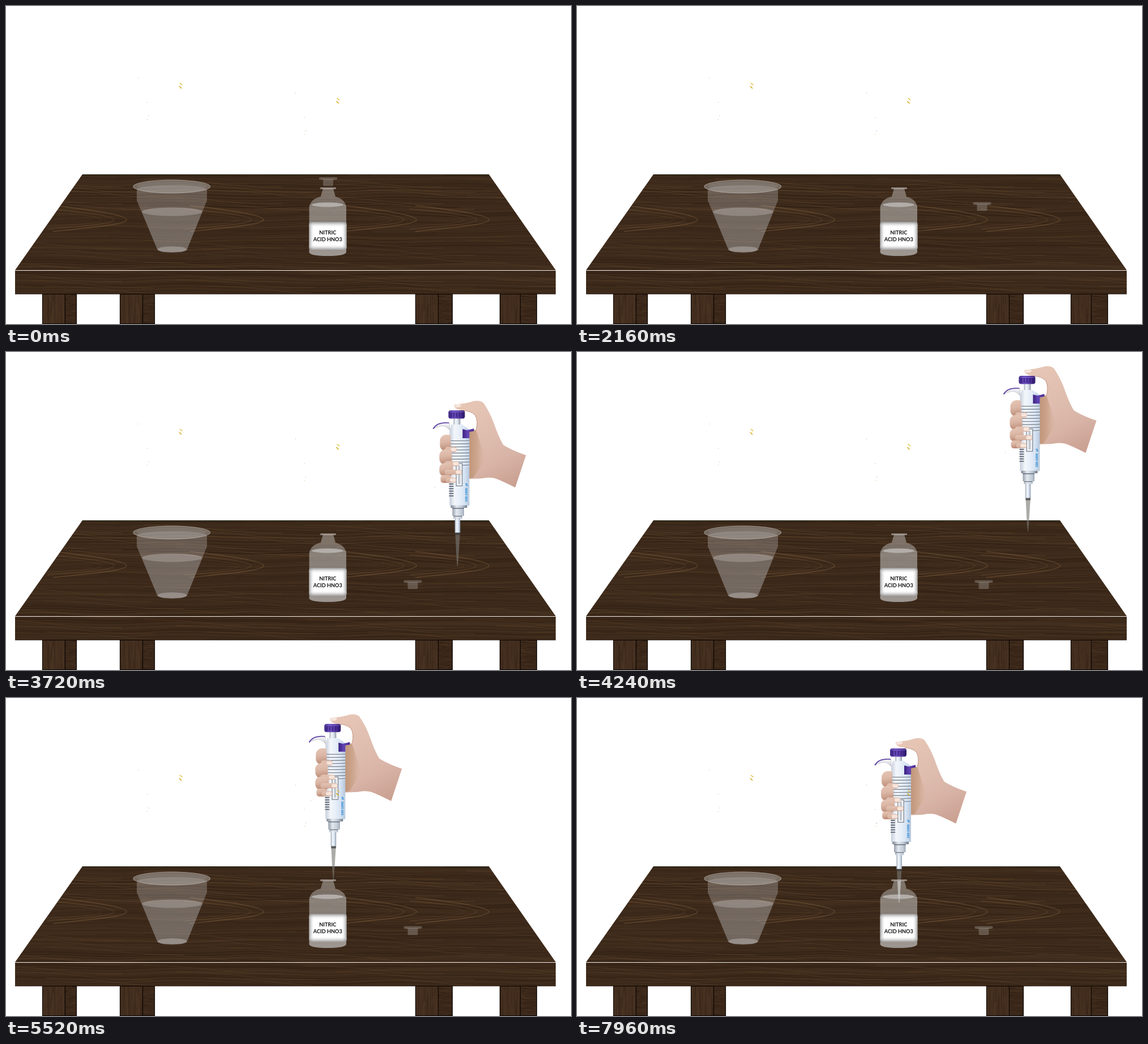
An HTML page with a canvas for the animation above (8 s loop, 998x561 px).

```html
<!DOCTYPE html>
<html lang="en">
<head>
<meta charset="utf-8">
<title>Pipetting nitric acid</title>
<style>
html, body { margin: 0; width: 100%; height: 100%; overflow: hidden; background: #fff; }
canvas { display: block; }
</style>
</head>
<body>
<canvas id="stage" width="998" height="561"></canvas>
<script>
const W = 998, H = 561, LOOP = 8000, STEP = 40;
const stage = document.getElementById('stage');
let c = stage.getContext('2d');

let seed = 11;
const rnd = () => (seed = (seed * 16807) % 2147483647) / 2147483647;

// Smooth monotone curve through [time, value] points.
function curve(pts) {
  const n = pts.length;
  const sec = pts.slice(1).map((p, i) => (p[1] - pts[i][1]) / (p[0] - pts[i][0]));
  const tan = pts.map((p, i) => {
    if (i === 0) return sec[0];
    if (i === n - 1) return sec[n - 2];
    const a = sec[i - 1], b = sec[i];
    return a * b <= 0 ? 0 : 2 * a * b / (a + b);
  });
  return t => {
    if (t <= pts[0][0]) return pts[0][1];
    if (t >= pts[n - 1][0]) return pts[n - 1][1];
    let i = 0;
    while (t > pts[i + 1][0]) i++;
    const h = pts[i + 1][0] - pts[i][0], u = (t - pts[i][0]) / h, v = 1 - u;
    return (1 + 2 * u) * v * v * pts[i][1] + u * v * v * h * tan[i]
      + u * u * (3 - 2 * u) * pts[i + 1][1] - u * u * v * h * tan[i + 1];
  };
}

const stopX = curve([[0, 569], [840, 633], [1680, 696.5], [2160, 715.5], [2520, 718], [2950, 718.5]]);
const stopY = curve([[0, 302], [400, 285], [820, 277], [1250, 287], [1680, 311.5], [2160, 346], [2950, 402.5]]);
const tipX = curve([[3060, 797.5], [3720, 797.5], [4240, 796.5], [5040, 651], [5460, 583], [5700, 570], [5880, 569]]);
const tipY = curve([[3060, 464], [3400, 421], [3720, 378], [4240, 317], [4560, 307], [5040, 304], [5460, 317], [5880, 361]]);
const level = curve([[5900, 361], [6740, 349], [7580, 332], [8000, 322]]);
const PIPETTE_IN = 3040;

function fill(d, color) {
  c.fillStyle = color;
  c.fill(new Path2D(d));
}
function line(d, color, width = 1) {
  c.strokeStyle = color;
  c.lineWidth = width;
  c.stroke(new Path2D(d));
}
function rect(x, y, w, h, color) {
  c.fillStyle = color;
  c.fillRect(x, y, w, h);
}
function round(x, y, w, h, r, color) {
  c.beginPath();
  c.roundRect(x, y, w, h, r);
  c.fillStyle = color;
  c.fill();
}
function oval(x, y, rx, ry, color, turn = 0) {
  c.beginPath();
  c.ellipse(x, y, rx, ry, turn, 0, 7);
  c.fillStyle = color;
  c.fill();
}
function grad(x0, y0, x1, y1, ...colors) {
  const g = c.createLinearGradient(x0, y0, x1, y1);
  colors.forEach((k, i) => g.addColorStop(i / (colors.length - 1), k));
  return g;
}
function within(d, paint) {
  c.save();
  c.clip(new Path2D(d));
  paint();
  c.restore();
}

function grain(x, y, w, h, wave) {
  for (let v = y - 8; v < y + h + 8; v += 0.8) {
    const light = rnd() < 0.5, phase = v / 27, a = 0.08 + rnd() * 0.22;
    c.strokeStyle = light ? `rgba(110,82,52,${a})` : `rgba(24,14,7,${a})`;
    c.lineWidth = 0.5 + rnd() * 0.7;
    const from = x + (rnd() * 1.2 - 0.5) * w, to = from + w * (0.4 + rnd() * 0.6);
    c.beginPath();
    for (let u = from; u <= to; u += 8) {
      c.lineTo(u, v + wave * (Math.sin(u / 62 + phase) + 0.5 * Math.sin(u / 29 - phase)));
    }
    c.stroke();
  }
}

function streaks(y, n, gap, alpha) {
  for (let k = 0; k < n; k++) {
    for (let x = -40; x < W; x += 284) {
      const sx = x + (k % 3) * 55, sy = y + k * gap;
      line(`M${sx} ${sy} q70 1 125 8 t120 6`, `rgba(118,88,56,${alpha})`, 1.1);
    }
  }
}

function arches() {
  for (const apex of [213, 455, 725, 853]) {
    for (let k = 0; k < 3; k++) {
      const a = apex - k * 22, h = 24 - k * 6, l = 130 - k * 12;
      line(`M${a - l} ${376 - h} C${a - 70} ${373 - h * 0.6} ${a} ${371 - h * 0.1} ${a} 377 S${a - 60} ${381 + h * 0.4} ${a - l} ${381 + h * 0.7}`,
        `rgba(126,94,60,${0.5 - k * 0.12})`, 1.6 - k * 0.3);
    }
  }
}

function leg(x, mid, right) {
  for (const [a, b, shade] of [[x, mid, '#432e1f'], [mid, right, '#3b281a']]) {
    within(`M${a} 508H${b}V561H${a}Z`, () => {
      rect(a, 508, b - a, 53, shade);
      if (a === x) {
        c.translate(a, 508);
        c.rotate(Math.PI / 2);
        grain(0, a - b, 60, b - a, 0.8);
      } else grain(a, 508, b - a, 53, 1.5);
    });
    line(`M${a + .5} 508.5H${b + .5}V560.5H${a + .5}Z`, '#0b0704', 1.2);
  }
}

function paintTable() {
  const top = 'M135 297H853L971 466H16Z', front = 'M16 467H971V508H16Z';
  [[64, 104, 124], [201, 241, 262], [723, 763, 788], [872, 908, 937]].forEach(l => leg(...l));
  within(top, () => {
    rect(0, 290, W, 180, '#3d2a1b');
    grain(0, 297, W, 169, 1.6);
    streaks(305, 5, 10, 0.36);
    arches();
    streaks(413, 4, 13, 0.26);
  });
  within(front, () => {
    rect(0, 466, W, 44, '#3d2a1b');
    grain(0, 468, W, 40, 1.6);
    streaks(472, 3, 11, 0.28);
  });
  line('M135 297.5H853', '#171c0c');
  line('M16 508H971', '#1a0f09');
  line('M16 466.5H971', '#f3eeea', 1.2);
}

function paintBeaker() {
  fill('M231 324V343L267 429A26.5 5.5 0 0 0 320 429L355 343V324A62 8 0 0 0 231 324Z', 'rgba(196,194,192,.32)');
  fill('M240 363L267 429A26.5 5.5 0 0 0 320 429L347 363A53.5 7.5 0 0 1 240 363Z', 'rgba(160,160,162,.2)');
  oval(293.5, 363, 53.5, 7.5, 'rgba(205,203,203,.38)');
  oval(293.5, 429.5, 26, 5.5, 'rgba(205,203,203,.36)');
  oval(292.7, 318.5, 68.5, 12, 'rgba(200,198,196,.4)');
  oval(293, 317.5, 61.5, 8.5, 'rgba(140,134,130,.35)');
  c.beginPath();
  c.ellipse(292.7, 318.5, 68, 11.5, 0, 0, 7);
  c.strokeStyle = 'rgba(215,212,210,.4)';
  c.lineWidth = 1;
  c.stroke();
}

function paintBottle() {
  fill('M560 322H578L582 336H556Z', 'rgba(205,202,200,.45)');
  round(555, 320, 28, 3, 1.2, 'rgba(215,212,210,.55)');
  fill('M557 336H580Q599 340 601 355V434Q600 441 568 441Q536 441 535.5 434V355Q538 340 557 336Z', 'rgba(200,198,196,.45)');
  fill('M536 351Q568 343 601 351V382H536Z', 'rgba(175,172,170,.27)');
  oval(568, 350.5, 28, 4, 'rgba(222,220,219,.5)');
  fill('M536 429H601V434Q600 441 568 441Q536 441 535.5 434Z', 'rgba(205,203,203,.42)');
  round(535.5, 381.5, 66, 48, 3, '#fff');
  const clear = '#fff0', shade = '#666a';
  round(535.5, 381.5, 66, 48, 3, grad(535, 0, 602, 0, shade, clear, clear, clear, clear, clear, clear, shade));
  round(535.5, 381.5, 66, 48, 3, grad(0, 381, 0, 430, shade, clear, clear, clear, clear, shade));
  c.fillStyle = '#111';
  c.font = '700 9.2px Lato, Roboto, sans-serif';
  c.textAlign = 'center';
  c.fillText('NITRIC', 568.3, 402.5);
  c.fillText('ACID HNO3', 568.3, 415);
}

function paintSpecks() {
  for (const [x, y] of [[0, 0], [277.5, 26.5]]) {
    c.save();
    c.translate(x, y);
    line('M307 136L311.5 139.5', '#e0bd3c', 1.5);
    line('M306 141.5L310 145.5', '#d2a50d', 1.5);
    [[233.5, 126.5], [249, 169.5], [251.5, 193.5], [249.2, 199.5]]
      .forEach(([a, b], i) => rect(a, b, 1, 1, x && i === 3 ? '#d9b653' : '#aaa'));
    c.restore();
  }
}

function paintStopper(x, y) {
  const glass = 'rgba(185,180,176,.32)';
  round(x - 16, y, 32, 4.5, 1.5, glass);
  rect(x - 12, y + 2.5, 24, 2.5, 'rgba(185,180,176,.16)');
  round(x - 9, y + 4, 18, 11.5, 2, glass);
}

function paintHand(p) {
  c.save();
  c.translate(560, 185);
  c.scale(1 - 0.015 * p, 1 - 0.015 * p);
  c.translate(-560, -185);
  fill('M563 79Q562 75 569 75Q584 74 596 70Q609 67 615 73Q626 89 633 108Q642 134 650 147Q666 157 690 165L671 222Q649 211 636 206Q625 203 612 206L588 207V120H602Q606 104 600 94Q592 86 579 86Q567 86 563 79Z',
    grad(595, 75, 668, 222, '#e6c5b5', '#dfbeb0', '#d8b4a7', '#c99f90'));
  fill('M589 121H602Q610 148 619 170Q607 190 597 205L588 206Z',
    grad(590, 0, 620, 0, '#c0967a', '#cfa891', '#dbb8a800'));
  line('M602 120Q606 104 600 94Q592 86.5 579 86.5', '#c0917d');
  oval(569.5, 77.7, 6, 2.8, '#f6e6de', -0.12);
  c.restore();
}

function paintFinger(x, y, w, h, nx, ny) {
  round(x, y, w, h, [h * .4, 4, h * .3, h * .38], grad(x, y, x + 4, y + h, '#e6c6b6', '#dab5a4', '#bb8b76'));
  round(x + 9, ny - 4.5, nx - x - 4, 9, 4.5, grad(0, ny - 5, 0, ny + 5, '#e4c5b5', '#d2ab99'));
  round(nx - 6, ny - 3, 10, 6, 2.6, '#f6e5dc');
}

// Drawn in place above the bottle: tip at (569, 361), plunger pressed by p.
function paintPipette(p, t) {
  paintHand(p);

  const hook = 'M526 119Q533 106 555 108.5V121Q549 113 541 113.5Q532 114.5 526 119Z';
  fill(hook, grad(0, 108, 0, 121, '#f4f4f8', '#e4e4ea', '#bfc0ca'));
  line(hook, '#b4b5c0', 0.6);
  line('M526 118.5Q533 106 554 108', '#5a3ca0', 1.6);

  rect(562, 100 + 3 * p, 12, 12 - 3 * p, grad(562, 0, 574, 0, '#a9b0bc', '#f6f8fb', '#d5dce6', '#8e97a5'));
  round(553, 86 + 3 * p, 29, 14.5, 4, grad(553, 0, 582, 0, '#3a2383', '#6a4cbc', '#5335a0', '#2c1867'));
  for (let x = 557; x < 581; x += 5) rect(x, 90 + 3 * p, 1.2, 8, '#2d1a70');
  rect(555, 88 + 3 * p, 25, 1, '#8368ca');

  fill('M558 111H577L590 120V254H555V122Z', grad(555, 0, 590, 0, '#c6cedb', '#f3f6fb', '#e8eff8', '#d6e3f3', '#b5c7dc'));
  fill('M578 119L586 121L598 118V122.5L590 124V135H578Z', grad(578, 0, 596, 0, '#39207f', '#6344b4', '#4b2f98'));
  for (let y = 139; y < 183; y += 5.4) {
    rect(555, y, 35, 1.5, '#7b838f');
    rect(555, y + 1.5, 35, 1, '#f6f9fd');
  }
  for (let y = 215; y < 238; y += 4.2) rect(554, y, 8, 1.6, '#555b65');
  rect(566, 179, 12, 41, '#8b929d');
  rect(567.5, 180.5, 9, 38, '#f4f6f8');
  rect(570, 183, 4, 33, '#c1c7d0');

  c.save();
  c.translate(586.7, 247.5);
  c.rotate(-Math.PI / 2);
  c.fillStyle = '#1682d4';
  c.textAlign = 'left';
  c.font = '700 5.8px "Liberation Sans", Arial, sans-serif';
  c.fillText('100-1000', 0, 0);
  c.fillText('µl', 28, 0);
  c.restore();

  paintFinger(538, 129, 19, 29, 563, 155);
  paintFinger(537, 155, 22, 27, 567, 180);
  paintFinger(537, 179, 24, 23, 572, 195);
  paintFinger(539, 200, 18, 14, 562, 209);

  const steel = grad(558, 0, 586, 0, '#818a98', '#e4e9f0', '#bfc8d3', '#6d7787');
  round(557, 253.5, 29, 4.5, 1, steel);
  rect(560, 258, 20.5, 14, steel);
  rect(560, 258, 20.5, 1.5, '#66707e');
  rect(562, 272, 15.5, 5, steel);
  rect(562, 272, 15.5, 1.2, '#66707e');
  rect(564.3, 277, 9.6, 25, grad(564, 0, 574, 0, '#929eae', '#f3f7fc', '#d8e3ef', '#8d9aab'));

  const tip = 'M565 302H573.5L570.5 348L569.5 361H568.5L567.3 348Z';
  fill(tip, 'rgba(120,120,115,.62)');
  rect(565, 301.5, 8.6, 4, 'rgba(50,50,54,.65)');
  if (t > 5900) within(tip, () => rect(560, level(t), 20, 45, 'rgba(235,234,232,.55)'));
  rect(528.5, 221, 1.2, 1.2, '#d6c79c');
}

function layer(...paints) {
  const cv = document.createElement('canvas');
  cv.width = W;
  cv.height = H;
  const main = c;
  c = cv.getContext('2d');
  paints.forEach(f => f());
  c = main;
  return cv;
}

const back = layer(paintTable, paintBeaker);
const fore = layer(paintBottle, paintSpecks);

function draw(now) {
  const t = Math.floor((now % LOOP) / STEP) * STEP;
  rect(0, 0, W, H, '#fff');
  c.drawImage(back, 0, 0);
  if (t >= PIPETTE_IN) {
    c.save();
    c.translate(tipX(t) - 569, tipY(t) - 361);
    paintPipette(Math.max(0, (t - 5900) / 2060), t);
    c.restore();
  }
  c.drawImage(fore, 0, 0);
  paintStopper(stopX(t), stopY(t));
}

const start = performance.now();
function tick() {
  draw(performance.now() - start);
  requestAnimationFrame(tick);
}
tick();
</script>
</body>
</html>
```
